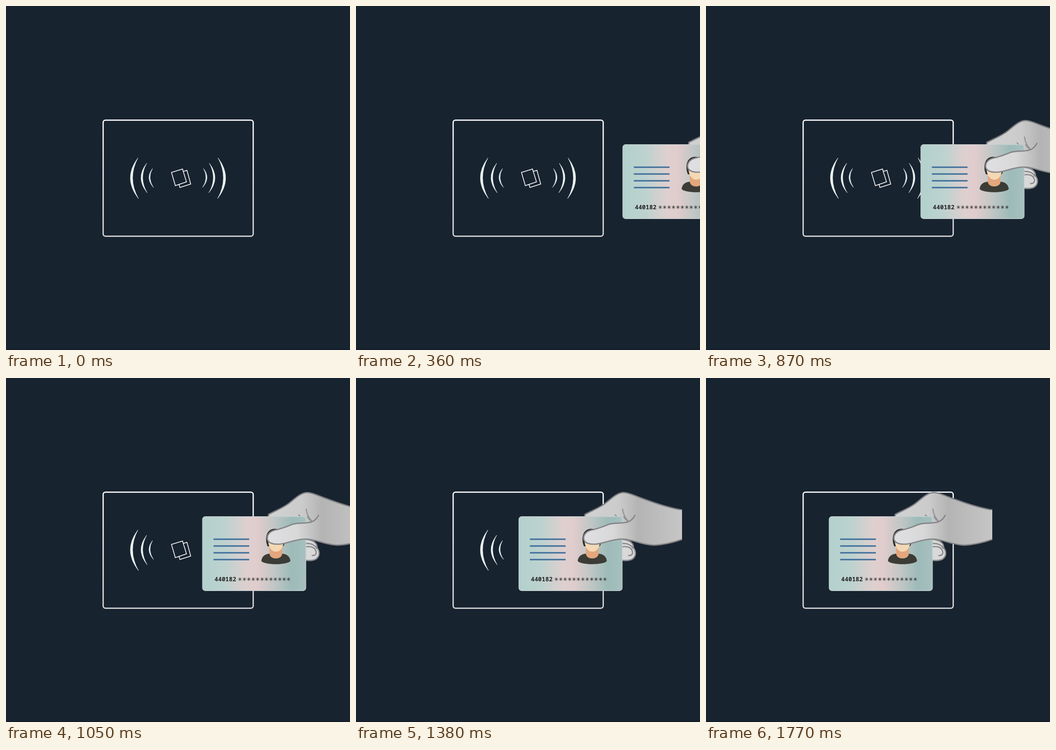
An HTML page that plays this animation: 709x709 px, repeating every 1.8 s.

```html
<!DOCTYPE html>
<html lang="en">
<head>
<meta charset="utf-8">
<title>Card reader</title>
<style>
  html, body { margin: 0; width: 100%; height: 100%; overflow: hidden; background: #182330; }
  svg { display: block; width: 100%; height: 100%; }
  .digits { font: 600 12.4px "Noto Sans Mono", monospace; }
  .stars { font: 15.15px "DejaVu Sans Mono", monospace; }
</style>
</head>
<body>
<svg viewBox="0 0 709 709">
  <defs>
    <linearGradient id="frame" x2="0" y2="1">
      <stop stop-color="#fff"/><stop offset="1" stop-color="#dedede"/>
    </linearGradient>
    <linearGradient id="plastic">
      <stop stop-color="#b2d1cd"/><stop offset=".22" stop-color="#bdd2cf"/>
      <stop offset=".43" stop-color="#dfcfcf"/><stop offset=".53" stop-color="#e0cccc"/>
      <stop offset=".7" stop-color="#bfc6c5"/><stop offset=".86" stop-color="#9dbbb9"/>
      <stop offset="1" stop-color="#a6c0be"/>
    </linearGradient>
    <linearGradient id="skin" gradientUnits="userSpaceOnUse" x1="389" x2="590" y1="0" y2="0">
      <stop stop-color="#d2d2d2"/><stop offset=".35" stop-color="#cbcbcb"/>
      <stop offset=".55" stop-color="#b4b4b4"/><stop offset="1" stop-color="#c6c6c6"/>
    </linearGradient>
    <linearGradient id="thumb" gradientUnits="userSpaceOnUse" x1="389" x2="590" y1="0" y2="0">
      <stop stop-color="#e0e0e3"/><stop offset=".3" stop-color="#d8d8d9"/>
      <stop offset=".55" stop-color="#b4b4b4"/><stop offset="1" stop-color="#c6c6c6"/>
    </linearGradient>
    <g id="waves" fill="#edf6f6"></g>
  </defs>

  <rect y="707" width="709" height="2" fill="#131d29"/>
  <rect x="200.2" y="235.2" width="309.3" height="239.3" rx="5" fill="none" stroke="url(#frame)" stroke-width="2.5"/>
  <use href="#waves"/>
  <use href="#waves" transform="translate(709) scale(-1 1)"/>
  <g fill="#182330" stroke="#fff" stroke-width="1.5">
    <path d="M365 341L373 338.7L380.7 367L358.5 374L350 345Z"/>
    <path d="M341 343L363.8 336L372 362.5L349 370.3Z"/>
  </g>

  <g id="mover">
    <g stroke="#8b8b8e" stroke-width="2.6" stroke-linecap="round">
      <path fill="#d9d9da" d="M460 332C480 333 490 338 490 350C496 358 495 367 489 372C484 377 474 377 460 375Z"/>
      <path fill="none" d="M466 341Q483 340 489 351M466 348Q485 345 488 358Q489 366 480 366"/>
    </g>
    <path fill="url(#skin)" d="M389 290L390 281C403 274 419 268 431 259C444 249 456 236 470 236C479 236 489 241 502 246C532 257 560 267 590 272V333Q560 343 533 344.5L470 332Z"/>
    <path fill="none" stroke="#7d7d80" stroke-width="2.6" d="M389 290L390 281C403 274 419 268 431 259C444 249 456 236 470 236C479 236 489 241 502 246C532 257 560 267 590 272"/>
    <path fill="none" stroke="#909092" stroke-width="2.2" stroke-linecap="round" d="M452 282L457 287M467.500 270Q469 284 479 295"/>

    <rect x="253.8" y="285.7" width="213" height="152.600" rx="5.500" fill="url(#plastic)" stroke="#c5d0cf" stroke-width="1.2"/>
    <path stroke="#41709c" stroke-width="3" d="M276.500 332.300h73.600m-73.600 14h73.600m-73.600 14h73.600m-73.600 14h73.600"/>
    <g fill="#252525">
      <text class="digits" x="278.600" y="419">440182</text>
      <text class="stars" x="326.400" y="422.800">************</text>
    </g>

    <path fill="#30302e" d="M388 347C384 338 384 328 387 321C391 312 399 310 406 311C417 311 424 319 424 331C424 339 423 344 420 347Z"/>
    <path fill="#3b3c36" d="M375 377C376 367 384 362 394 362H416C426 362 434 367 435 377C430 386 380 386 375 377Z"/>
    <path fill="#e3a67d" d="M392 346H418V363C416 375 394 375 392 363Z"/>
    <path fill="#f4d8b4" d="M389.500 330H421C422 347 416 358 405 358C395 358 388 346 389.500 330Z"/>

    <path fill="url(#thumb)" d="M493 283C489 291 482 297 472 298C460 300 449 298 438 302C426 307 415 311 403 313.500C393 316 386 323 387.500 332C389 340 399 343 410 342.500C429 342 444 331 469 332C490 333 507 344 533 344.500Q560 343 590 333V272Z"/>
    <path fill="none" stroke="#858588" stroke-width="2.6" stroke-linecap="round" d="M493 283C489 291 482 297 472 298C460 300 449 298 438 302C426 307 415 311 403 313.500C393 316 386 323 387.500 332C389 340 399 343 410 342.500C429 342 444 331 469 332C490 333 507 344 533 344.500Q560 343 589 333"/>
    <path fill="none" stroke="#909092" stroke-width="2.2" stroke-linecap="round" d="M470 286Q473 292 479 295"/>
  </g>
</svg>
<script>
  const LOOP = 1800, STEP = 30;
  const HOME = 253.5, START = 625.2, SPEED = 0.21;
  const mover = document.getElementById("mover");

  // Each crescent lies between two curves sharing their end points.
  const crescent = (x, top, bottomX, bottom, outer, inner) => {
    const mid = (top + bottom) / 2;
    return `<path d="M${x} ${top}Q${outer} ${mid} ${bottomX} ${bottom}Q${inner} ${mid} ${x} ${top}Z" stroke="#edf6f6" stroke-width=".6"/>`;
  };
  document.getElementById("waves").innerHTML =
    crescent(272, 313, 273, 397, 240, 249.5) +
    crescent(290, 324, 291, 385, 266, 273) +
    crescent(302, 335, 304, 374, 286.5, 291);

  function draw(now) {
    const time = Math.floor((now % LOOP) / STEP) * STEP;
    mover.style.display = time ? "" : "none";
    mover.setAttribute("transform", `translate(${START - SPEED * time - HOME})`);
  }

  function tick(now) {
    draw(now);
    requestAnimationFrame(tick);
  }
  draw(0);
  let origin;
  requestAnimationFrame(function run(now) {
    origin ??= now;
    draw(now - origin);
    requestAnimationFrame(run);
  });
</script>
</body>
</html>
```
